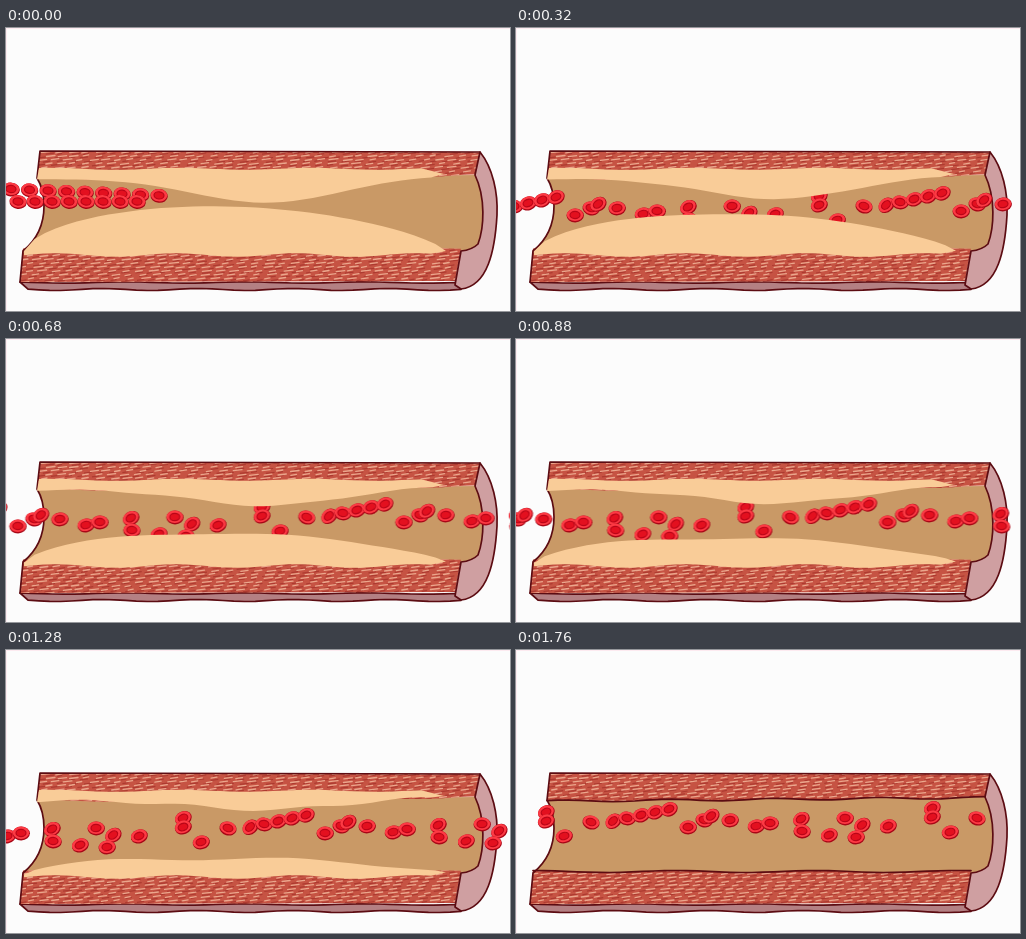
An HTML page for the animation above (1.8 s loop, 504 by 283 pixels).

```html
<!DOCTYPE html>
<html lang="en">
<head>
<meta charset="utf-8">
<title>Blood vessel</title>
<style>
  html, body { margin: 0; width: 100%; height: 100%; overflow: hidden; background: #fcfcfc; }
  svg { display: block; width: 504px; height: 283px; }
  .line { fill: none; stroke: #5c0c12; stroke-width: 1.7; stroke-linecap: round; stroke-linejoin: round; }
  .wall { fill: #c65343; }
  .light { fill: none; stroke: #eba68c; stroke-width: 1.3; stroke-linecap: round; }
  .dark { fill: none; stroke: #ad3a30; stroke-width: 1.2; }
  .plaque { fill: #f9cc98; }

  #cluster, #drift, #tail, #plaques { animation: 1800ms step-end infinite; }
  #cluster { animation-name: first; }
  #drift { animation-name: middle; }
  #tail { animation-name: last; }
  #plaques { animation-name: narrowed; }
  @keyframes first { 0% { opacity: 1 } 2.2%, 100% { opacity: 0 } }
  @keyframes middle { 0% { opacity: 0 } 2.2% { opacity: 1 } 93.3%, 100% { opacity: 0 } }
  @keyframes last { 0% { opacity: 0 } 93.3%, 100% { opacity: 1 } }
  @keyframes narrowed { 0% { opacity: 1 } 93.3%, 100% { opacity: 0 } }

  .flow, .plaque { animation: 1800ms steps(45) infinite; }
  #drift .flow { animation-name: drift; }
  #tail .flow { animation-name: tail; }
  #upper { animation-name: upper; }
  #lower { animation-name: lower; }
  @keyframes drift { from { transform: translate(315px, 6px) } to { transform: translate(78.75px, 6px) } }
  @keyframes tail { from { transform: translate(231px, 0) } to { transform: translate(-5.25px, 0) } }
</style>
</head>
<body>
<svg viewBox="0 0 504 283">
  <defs>
    <g id="cell">
      <ellipse cx=".2" cy=".5" rx="8.7" ry="6.9" fill="#a80616"/>
      <ellipse cy="-.2" rx="8.2" ry="6.2" fill="#fd3a44"/>
      <ellipse rx="5" ry="3.6" fill="#e3101f" stroke="#b90517" stroke-width="1.2"/>
    </g>
    <clipPath id="topClip"><path id="topBand"/></clipPath>
    <clipPath id="lowClip"><path id="lowBand"/></clipPath>
  </defs>
  <path d="M0 .5H504M.5 0V283" fill="none" stroke="#fdeaf0"/>

  <path d="M31 150C36 158 38 166 38 178C38 200 28 214 17 223L455 223Q466 222 472 216C478 200 479 170 470 147Z" fill="#c99966"/>
  <path id="lip" class="line" style="fill:#b48083"/>

  <g clip-path="url(#topClip)">
    <rect class="wall" x="20" y="118" width="460" height="40"/>
    <path class="dark" data-y="122"/><path class="light" data-y="124"/>
  </g>
  <g clip-path="url(#lowClip)">
    <rect class="wall" x="5" y="215" width="455" height="45"/>
    <path class="dark" data-y="218"/><path class="light" data-y="220"/>
  </g>

  <path class="line" d="M474 124L34 123L31 150C36 158 38 166 38 178C38 200 28 214 17 223L14 254"/>
  <path class="line" style="fill:#cf9fa1" d="M474 124C487 140 492 165 491 187C489 222 482 258 455 261L449 257L455 223Q466 222 472 216C478 200 480 170 469 147Z"/>

  <g id="cluster"></g>
  <g id="drift"><g class="flow"></g></g>
  <g id="tail">
    <path class="line" id="topEdge"/>
    <path class="line" id="lowEdge"/>
    <g class="flow"></g>
  </g>
  <g id="plaques">
    <path class="plaque" id="upper"/>
    <path class="plaque" id="lower"/>
  </g>
</svg>
<script>
  const $ = s => document.querySelector(s);
  const setPath = (s, d) => $(s).setAttribute('d', d);
  const wave = (x, length, peak = 0) => Math.cos((x - peak) / length * 2 * Math.PI);

  // Points of y = f(x) from a to b, in either direction.
  function trace(a, b, f, n = 40) {
    return Array.from({ length: n + 1 }, (_, i) => {
      const x = a + (b - a) * i / n;
      return `${x.toFixed(1)} ${f(x).toFixed(1)}`;
    }).join('L');
  }

  let seed = 7;
  const random = () => (seed = seed * 16807 % 2147483647) / 2147483647;

  // Vessel walls
  const topEdge = trace(31, 469, x => 151.5 - x / 120 + wave(x, 105, 205));
  const lowEdge = trace(17, 455, x => 221.5 + wave(x, 140, 90));
  setPath('#topEdge', 'M' + topEdge);
  setPath('#lowEdge', 'M' + lowEdge);
  setPath('#topBand', `M${topEdge}L474 124L34 123Z`);
  setPath('#lowBand', `M${lowEdge}L449 253L14 254Z`);
  setPath('#lip', `M${trace(14, 449, x => 254.5 + .7 * wave(x, 120, 60))}L455 261` +
    `L${trace(455, 22, x => 261.5 + wave(x, 95, 50))}Z`);

  for (const el of document.querySelectorAll('[data-y]')) {
    let d = '';
    for (let row = 0; row < 10; row++)
      for (let x = 8 + row % 2 * 6; x < 476; x += 11 + random() * 4)
        d += `M${x.toFixed(1)} ${(+el.dataset.y + row * 3.8 + random()).toFixed(1)}l${(5 + random() * 4).toFixed(1)} -1`;
    el.setAttribute('d', d);
  }

  // Plaques: t runs from 0 (thick) to 1 (thin and rippled).
  const mix = (a, b, t) => a + (b - a) * t;
  const upper = t => {
    const face = x => 151 - (x - 31) / 100 + mix(26, 5, t) * Math.exp(-(((x - 262) / 105) ** 2)) + 2 * t * wave(x, 110, 130);
    return `M${trace(31, 425, face)}L438 146L${trace(415, 33, x => 140.8 + wave(x, 130, 110))}Z`;
  };
  const lower = t => {
    const face = x => {
      const s = (x - 18) / 422;
      return 223 - mix(113, 6, t) * s ** .6 * (1 - s) ** .75 - 2.5 * t * wave(x, 190, 285);
    };
    return `M${trace(18, 440, face)}L${trace(425, 18, x => 227 + 1.8 * wave(x, 120, 110))}Z`;
  };
  const style = document.createElement('style');
  for (const shape of [upper, lower])
    style.textContent += `@keyframes ${shape.name} { from { d: path("${shape(0)}") } to { d: path("${shape(1)}") } }`;
  document.head.append(style);

  // Clumps of touching cells: x, y, then count and step to the next cell
  const clumps = [
    [30, 162, 2, 0, 9], [48, 186], [75, 172], [97, 171, 5, 14, -3], [172, 177], [188, 170, 2, 7, -4],
    [214, 170], [240, 176, 2, 14, -3], [285, 169, 2, 1, 12], [313, 185], [329, 168], [346, 175, 2, -6, 12], [372, 176]
  ];
  const cells = clumps.flatMap(([x, y, n = 1, dx, dy]) =>
    Array.from({ length: n }, (_, i) => ({ x: x + i * (dx || 0), y: y + i * (dy || 0), tilt: 20 - 70 * random() })));
  const strip = [-1, 0, 1].flatMap(k => cells.map(c => ({ ...c, x: c.x + k * 386, y: c.y - k * 4 })));

  // Two crowded rows at the inlet
  const cluster = Array.from({ length: 17 }, (_, i) => {
    const k = i >> 1;
    return i % 2 ? { x: 12 + 17 * k, y: 173.5, tilt: 6 } : { x: 5 + 18.5 * k, y: 161 + .8 * k, tilt: 6 };
  });

  const draw = list => list.map(c =>
    `<use href="#cell" transform="translate(${c.x} ${c.y}) rotate(${c.tilt})"/>`).join('');
  $('#cluster').innerHTML = draw(cluster);
  $('#drift .flow').innerHTML = draw(strip);
  $('#tail .flow').innerHTML = draw(strip.filter(c => c.x > -20 && c.x < 465));
</script>
</body>
</html>
```
